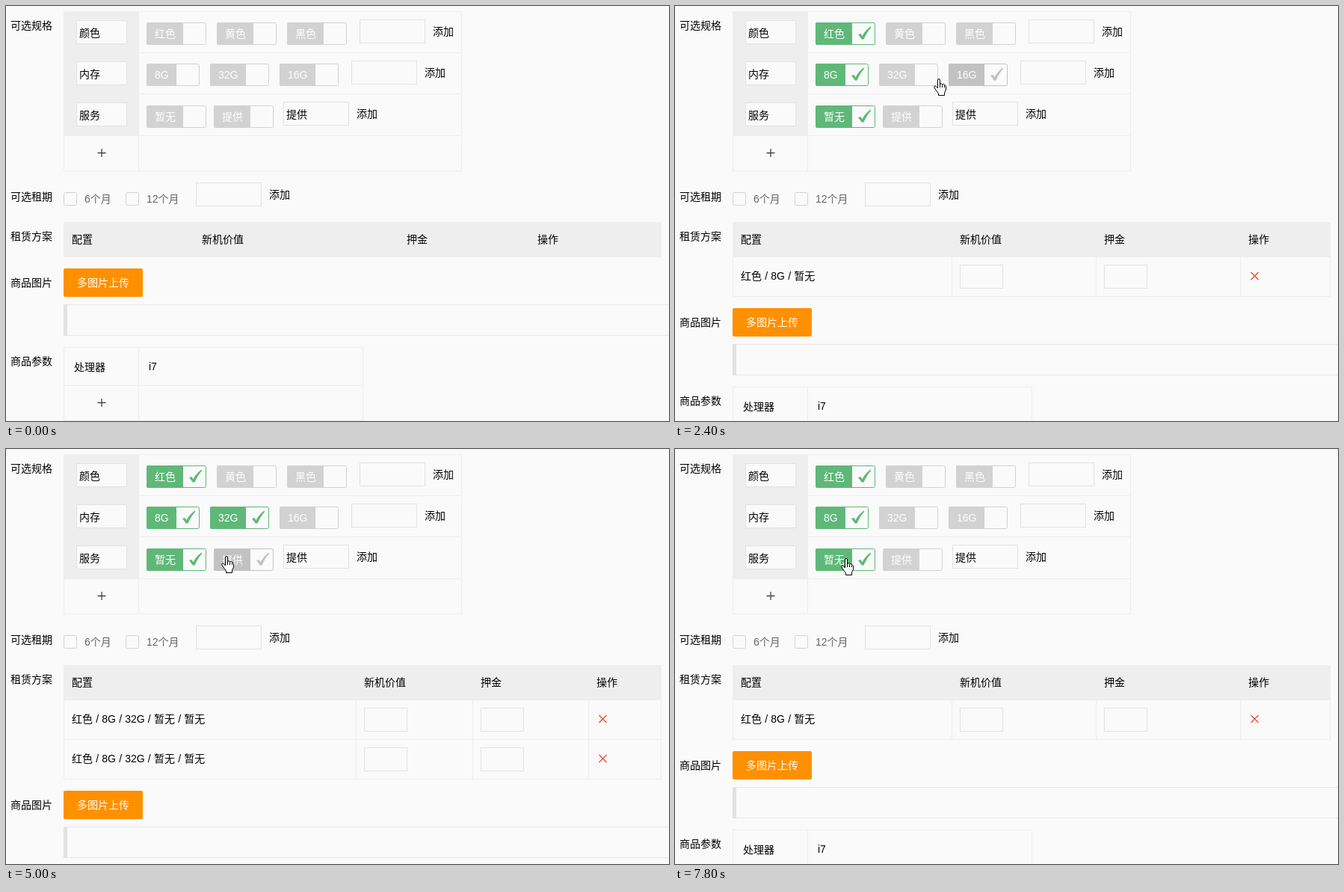
These frames come from a looping animation (887x555 px, 8 s). An HTML page:

```html
<!DOCTYPE html>
<html lang="zh-CN">
<head>
<meta charset="utf-8">
<title>商品规格</title>
<style>
  html, body { margin: 0; width: 100%; height: 100%; overflow: hidden; background: #fafafa; }
  svg { display: block; }
  text { font: 14px "Liberation Sans", "Noto Sans CJK SC", "Noto Sans CJK", sans-serif; white-space: pre; word-spacing: .3px; }
</style>
</head>
<body>
<svg id="stage" width="887" height="555" viewBox="0 0 887 555"></svg>
<script>
const LOOP = 8000, STEP = 100, ROW = 53;
const LINE = '#eee', PAGE = '#fafafa';

const specs = [
  { name: '颜色', labels: ['红色', '黄色', '黑色'], gap: 14, value: '' },
  { name: '内存', labels: ['8G', '32G', '16G'], gap: 14, value: '' },
  { name: '服务', labels: ['暂无', '提供'], gap: 10, value: '提供' }
];

// Times at which an option is toggled
const clicks = { '红色': [900], '8G': [1400], '32G': [3000, 7000], '暂无': [1800, 6100, 7700] };

// Pointer moves: start, end, destination
const entry = [644, 3];
const moves = [
  [100, 700, 222, 38],
  [900, 1200, 214, 88],
  [1300, 1400, 221, 135],
  [1500, 1600, 228, 145],
  [1800, 2200, 415, 99],
  [2200, 2600, 308, 95],
  [3800, 3900, 312, 116],
  [3900, 4300, 345, 232],
  [4300, 5000, 293, 143],
  [5500, 5800, 234, 146],
  [6300, 6800, 295, 86],
  [7000, 7500, 227, 146]
];

const pen = document.createElement('canvas').getContext('2d');
pen.font = '14px "Liberation Sans", sans-serif';
const charWidth = c => c > '\u2fff' ? 14 : Math.round(pen.measureText(c).width);
const textWidth = s => [...s].reduce((sum, c) => sum + charWidth(c), 0);

// Options flow from left to right, followed by the input of their row.
const options = specs.flatMap((spec, row) => {
  let x = 188;
  const list = spec.labels.map(label => {
    const option = { label, row, x, y: Math.round(22 + 55.4 * row), w: textWidth(label) + 52 };
    x += option.w + spec.gap;
    return option;
  });
  spec.inputX = x + 3;
  return list;
});

const text = (x, y, s, fill = '#000') => `<text x="${x}" y="${y}" fill="${fill}">${s}</text>`;
const rect = (x, y, w, h, fill) => `<rect x="${x}" y="${y}" width="${w}" height="${h}" fill="${fill}"/>`;
const box = (x, y, w, h, stroke = LINE, fill = 'none', r = 0) =>
  `<rect x="${x + .5}" y="${y + .5}" width="${w - 1}" height="${h - 1}" rx="${r}" fill="${fill}" stroke="${stroke}"/>`;
const path = (d, stroke, width = 1, fill = 'none') =>
  `<path d="${d}" stroke="${stroke}" stroke-width="${width}" fill="${fill}"/>`;
const hLine = (x, y, w) => rect(x, y, w, 1, LINE);
const vLine = (x, y, h) => rect(x, y, 1, h, LINE);
const input = (x, y, w = 88) => box(x, y, w, 32, '#e2e2e2', PAGE);
const plus = (x, y) => path(`M${x - 5.5} ${y}h11m-5.5 -5.5v11`, '#444', 1.3);
const move = (x, y, content) => `<g transform="translate(${x} ${y})">${content}</g>`;

const isChecked = (label, t) => (clicks[label] || []).filter(c => c <= t).length % 2 === 1;

function pointerAt(t) {
  if (t < moves[0][0]) return null;
  let [x, y] = entry;
  for (const [start, end, toX, toY] of moves) {
    if (t < start) break;
    const k = Math.min(1, (t - start) / (end - start));
    const eased = 1 - (1 - k) ** 1.3;
    x += (toX - x) * eased;
    y += (toY - y) * eased;
  }
  return [Math.round(x), Math.round(y)];
}

const optionAt = p => p && options.find(o =>
  p[0] >= o.x && p[0] < o.x + o.w && p[1] >= o.y && p[1] < o.y + 30);

function drawOption(o, t, hovered) {
  const checked = isChecked(o.label, t);
  const color = checked ? '#5fb878' : hovered ? '#c2c2c2' : '#d2d2d2';
  const split = o.w - 31;
  const tick = path('M8 16l3.5-1 2 3.2Q17.5 10.5 24.5 5.5L25.3 6.8Q19.5 13 15.5 22.5H12.8z', 'none', 0, color);
  return move(o.x, o.y,
    box(0, 0, o.w, 30, color, 'none', 2) +
    path(`M2 0H${split}V30H2Q0 30 0 28V2Q0 0 2 0`, 'none', 0, color) +
    text(11, 20, o.label, '#fff') +
    (checked || hovered ? move(split, 0, tick) : ''));
}

function drawSpecs(t, hovered) {
  let s = text(6, 31, '可选规格') + box(77, 7, 533, 214) + rect(77, 7, 101, 167, '#eee') + vLine(177, 7, 213);
  specs.forEach(({ name, inputX, value }, i) => {
    const y = 55 * i;
    s += hLine(77, Math.round(62 + 55.4 * i), 532) + input(94, 19 + y, 68) + text(98, 41 + y, name) +
      input(inputX, 18 + y) + text(inputX + 4, 40 + y, value) + text(inputX + 98, 39 + y, '添加');
  });
  return s + plus(128, 196.5) + options.map(o => drawOption(o, t, o === hovered)).join('');
}

function drawTerms() {
  const term = (x, label) => box(x, 249, 18, 18, '#d2d2d2', 'none', 2) + text(x + 28, 263, label, '#666');
  return text(6, 260, '可选租期') + term(77, '6个月') + term(160, '12个月') +
    input(254, 236) + text(352, 257, '添加');
}

// One row per checked memory size; the checked services repeat with it.
function planAt(t) {
  const [colors, sizes, services] = specs.map(s => s.labels.filter(label => isChecked(label, t)));
  const count = colors.length && Math.max(1, sizes.length);
  const repeated = Array(count).fill(services).flat();
  return { count, config: [...colors, ...sizes, ...repeated].join(' / ') };
}

// Columns share the table width in proportion to their content.
function planColumns({ count, config }) {
  const weights = [textWidth(config || '配置') + 21, count ? 79 : 77, count ? 79 : 49, 49.5];
  const scale = 800 / weights.reduce((a, b) => a + b);
  let x = 77;
  return weights.slice(0, 3).map(w => Math.floor(x += w * scale));
}

function drawPlan(plan) {
  const cols = planColumns(plan);
  const [price, deposit, action] = cols;
  let s = text(6, 313, '租赁方案') + rect(77, 289, 800, 47, '#eee') + text(88, 317, '配置') +
    text(price + 11, 317, '新机价值') + text(deposit + 11, 317, '押金') + text(action + 11, 317, '操作');
  for (let i = 0; i < plan.count; i++) {
    const y = 336 + ROW * i;
    s += hLine(77, y + 52, 800) + [77, ...cols, 876].map(x => vLine(x, y, ROW)).join('') +
      text(88, y + 30, plan.config) + input(price + 11, y + 10, 58) + input(deposit + 11, y + 10, 58) +
      path(`M${action + 14.5} ${y + 20}l10 10m0 -10l-10 10`, '#ff4422', 1.3);
  }
  return s;
}

function drawLower() {
  return text(6, 375, '商品图片') +
    '<rect x="77" y="351" width="106" height="38" rx="2" fill="#ff9000"/>' + text(95, 375, '多图片上传', '#fff') +
    box(77, 399, 820, 42, '#e8e8e8') + rect(77, 399, 5, 42, '#e2e2e2') +
    text(6, 480, '商品参数') + box(77, 456, 401, 99) + vLine(177, 456, 99) + hLine(77, 507, 400) +
    text(91, 488, '处理器') + text(191, 487, 'i7') + plus(128, 530.5);
}

function drawPointer(p) {
  if (!p) return '';
  const hand = 'M5.5 13V2a1.5 1.5 0 0 1 3 0V8a1.5 1.5 0 0 1 3 .6a1.5 1.5 0 0 1 3 .8a1.2 1.2 0 0 1 2 1V15l-2 4v3.5H6.5V20l-3-4-2.6-4c-.8-1.6 1-2.8 2.2-1.6z';
  const arrow = 'M.5 .5v16l3.7-3.6 2.6 5.8 2.2-1-2.6-5.6h5.1z';
  return optionAt(p)
    ? move(p[0] - 5, p[1], path(hand + 'M8.5 8v4m3-3v3m3-2v2', '#000', 1, '#fff'))
    : move(p[0], p[1], path(arrow, '#000', 1, '#fff'));
}

const stage = document.getElementById('stage');
let shown = -1;

function frame(now) {
  const t = Math.floor(now % LOOP / STEP) * STEP;
  if (t !== shown) {
    shown = t;
    const plan = planAt(t);
    const hovered = optionAt(pointerAt(t - STEP)); // hover colour trails the pointer
    stage.innerHTML = drawSpecs(t, hovered) + drawTerms() + drawPlan(plan) +
      move(0, ROW * plan.count, drawLower()) + drawPointer(pointerAt(t));
  }
  requestAnimationFrame(frame);
}
frame(0);
</script>
</body>
</html>
```
